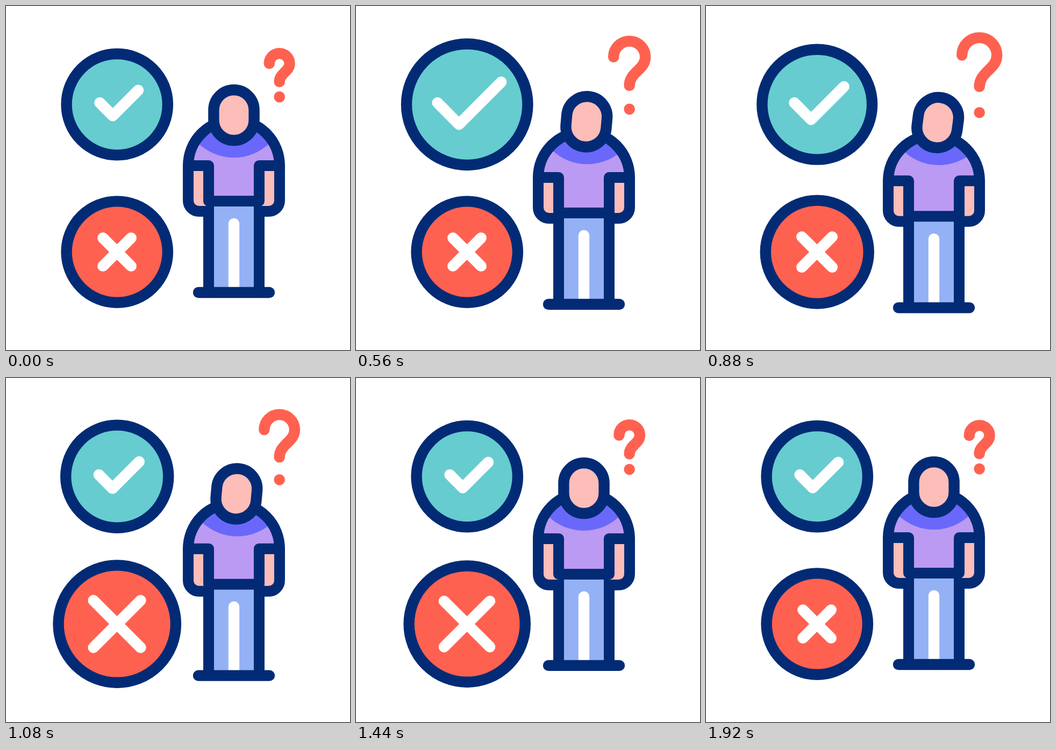
Animation of 640 by 640 pixels, one loop 2 s. Source, as an HTML page with a canvas:

```html
<!DOCTYPE html>
<html lang="en">
<head>
<meta charset="utf-8">
<title>Decision</title>
<style>
  html, body { margin: 0; width: 100%; height: 100%; overflow: hidden; background: #fff; }
  canvas { display: block; }
</style>
</head>
<body>
<canvas id="stage" width="640" height="640"></canvas>
<script>
const ctx = document.getElementById("stage").getContext("2d");
const NAVY = "#032b75", TEAL = "#66ccd0", RED = "#ff6150", SKIN = "#fdbdb9",
      SHIRT = "#bb9af3", COLLAR = "#6a68fb", JEANS = "#94b1f5", WHITE = "#fff";
const LOOP = 2000, STEP = 40, LINE = 20.4;

const ease = (t, from, to) => {
  const x = Math.min(1, Math.max(0, (t - from) / (to - from)));
  return (1 - Math.cos(Math.PI * x)) / 2;
};
// Rises from a to b, holds, and falls from c to d.
const pulse = (t, a, b, c, d) => ease(t, a, b) * (1 - ease(t, c, d));

function stroke(path, color, width = LINE, cap = "round") {
  ctx.strokeStyle = color;
  ctx.lineWidth = width;
  ctx.lineCap = cap;
  ctx.lineJoin = "round";
  ctx.stroke(path);
}

function fill(path, color) {
  ctx.fillStyle = color;
  ctx.fill(path);
}

function disc(x, y, r) {
  const path = new Path2D();
  path.arc(x, y, r, 0, 2 * Math.PI);
  return path;
}

// Enlarges the geometry around a point while the line weight stays the same.
function scaled(d, x, y, s) {
  const path = new Path2D();
  path.addPath(new Path2D(d), new DOMMatrix([s, 0, 0, s, x, y]));
  return path;
}

function badge(y, color, p, mark) {
  const ring = disc(206.7, y, 94.2 + 18.9 * p);
  fill(ring, color);
  stroke(ring, NAVY);
  stroke(mark, WHITE);
}

function question(p) {
  const x = 508.7, y = 128.6, s = 1 + 0.745 * p;
  const hook = "M-18.9-21.6A18.9 18.9 0 0 1 18.9-21.6C18.9-13 13-8.5 9-4.5C4 .5 0 5 0 12.4";
  stroke(scaled(hook, x, y, s), RED);
  fill(disc(x, y + 40.5 * s, 10.3), RED);
}

function arm(drop, hand) {
  const top = 297 + drop, low = 382 + hand;
  const outline = `M339 ${top}V${low - 20}a20 20 0 0 0 20 20H377`;
  fill(new Path2D(`${outline}V${top}Z`), SKIN);
  stroke(new Path2D(outline), NAVY, 20, "butt");
  stroke(new Path2D(`M339 ${top}H377V${363 + drop}`), NAVY, 20);
}

function person(t) {
  const drop = 29 * pulse(t, 185, 742, 806, 1565);
  const hand = 19 * pulse(t, 197, 782, 812, 1660);
  const nod = 13.4 * pulse(t, 132, 674, 960, 1600);
  const tilt = 7.5 * pulse(t, 267, 747, 880, 1400);

  const placeHead = () => {
    ctx.translate(424, 258 + nod);
    ctx.rotate(tilt * Math.PI / 180);
    ctx.translate(-424, -258);
  };

  // Legs
  ctx.save();
  ctx.translate(0, drop);
  fill(new Path2D("M377 363H471V533H377Z"), JEANS);
  stroke(new Path2D("M424 405V533"), WHITE);
  stroke(new Path2D("M377 363V533M471 363V533"), NAVY, 20, "butt");
  stroke(new Path2D("M358 533H490"), NAVY);

  // Shirt with the collar clipped to it
  const shirt = new Path2D("M339 297A85 85 0 0 1 509 297H471V363H377V297Z");
  fill(shirt, SHIRT);
  ctx.save();
  ctx.clip(shirt);
  ctx.translate(0, -drop);
  placeHead();
  fill(disc(424, 186, 96), COLLAR);
  ctx.restore();
  stroke(new Path2D("M339 297A85 85 0 0 1 509 297"), NAVY, 20);
  stroke(new Path2D("M377 363H471"), NAVY, 20, "butt");
  ctx.restore();

  arm(drop, hand);
  ctx.save();
  ctx.translate(848, 0);
  ctx.scale(-1, 1);
  arm(drop, hand);
  ctx.restore();

  // Head
  ctx.save();
  placeHead();
  const hood = new Path2D();
  hood.roundRect(386.4, 156, 75.2, 94, 37.6);
  fill(hood, SKIN);
  stroke(hood, NAVY);
  ctx.restore();
}

function draw(t) {
  ctx.fillStyle = WHITE;
  ctx.fillRect(0, 0, 640, 640);
  const yes = pulse(t, 100, 500, 500, 1200);
  const no = pulse(t, 800, 1200, 1200, 1900);
  badge(183.2, TEAL, yes,
    scaled("M-34.8 0L-10.7 24.3L36.7-23.2", 209.3, 180, 1 + 0.67 * yes));
  badge(457.6, RED, no,
    scaled("M-26.2-26.2L26.2 26.2M26.2-26.2L-26.2 26.2", 206.5, 457.7, 1 + 0.85 * no));
  person(t);
  question(pulse(t, 176, 749, 796, 1522));
}

const start = performance.now();
function frame() {
  const t = (performance.now() - start) % LOOP;
  draw(Math.min(LOOP - 2 * STEP, Math.floor(t / STEP) * STEP));
  requestAnimationFrame(frame);
}
frame();
</script>
</body>
</html>
```
